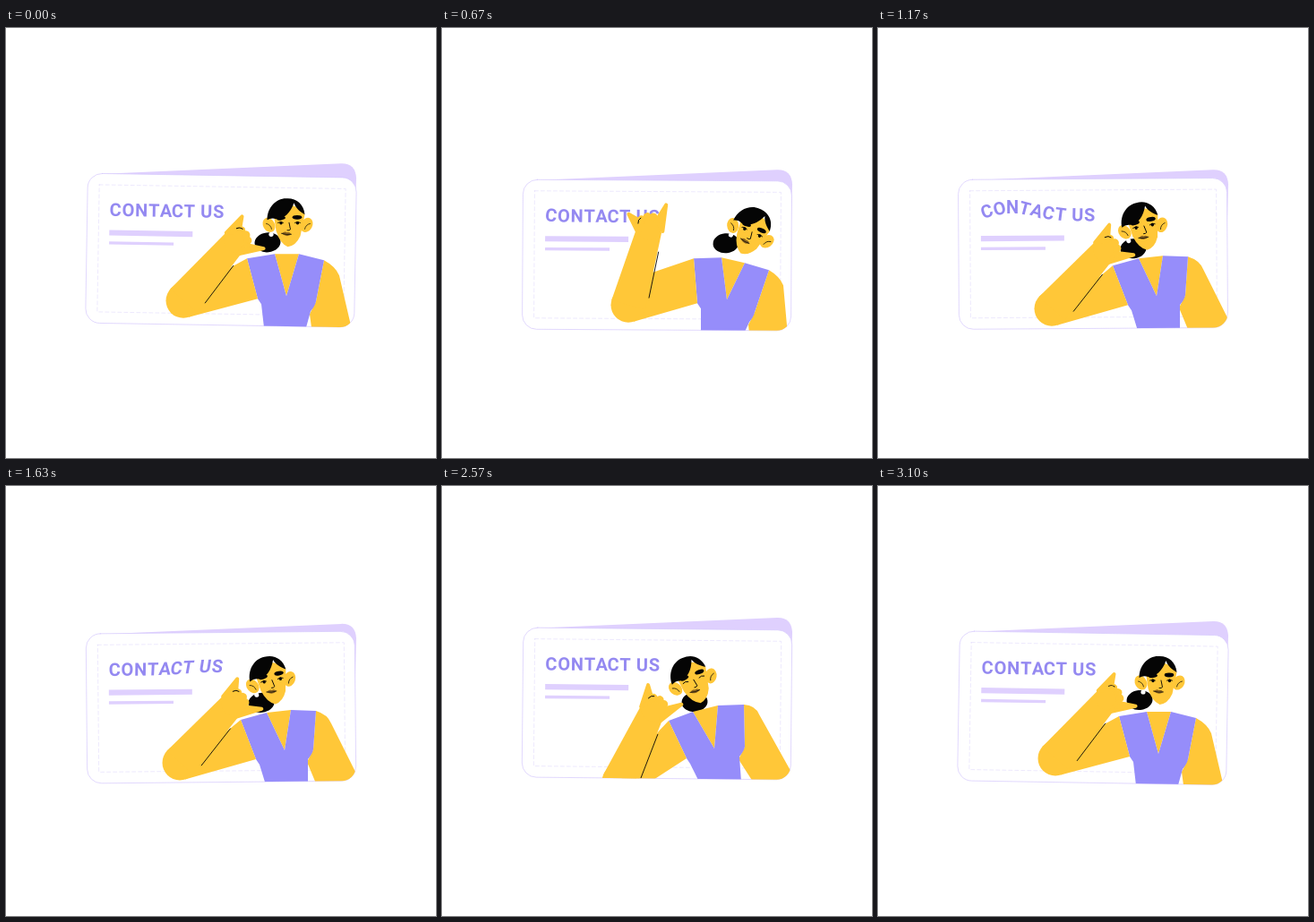
An HTML page with a canvas for the animation above (3130 ms loop, 480x480 px).

```html
<!DOCTYPE html>
<html lang="en">
<head>
<meta charset="utf-8">
<title>Contact card</title>
<style>
html, body { margin: 0; width: 100%; height: 100%; overflow: hidden; background: #fff; }
canvas { display: block; width: 480px; height: 480px; }
</style>
</head>
<body>
<canvas width="480" height="480"></canvas>
<script>
const ctx = document.querySelector('canvas').getContext('2d');
const LOOP = 3130, TAU = Math.PI * 2, RAD = Math.PI / 180;
const SKIN = '#ffc738', VEST = '#968dfa', TEXT = '#9489f1', PALE = '#dfd0fe', INK = '#050505';

// Joints: [x, y] points, or single values for angles and amounts.
const ear = {
  head: [314.5, 222], tilt: [0], bun: [292, 241],
  L1: [269, 259], L2: [300, 254], V: [313, 301], R1: [327, 254], R2: [355, 261],
  sideR: [346, 307], hipR: [335, 336], hipL: [288, 336], sideL: [281, 304],
  shoulder: [368, 268], outer: [386, 338], inner: [341, 336],
  elbow: [198, 306], arm: [41], hand: [60], crease: [64], eyes: [1]
};
const wave = {
  head: [343.5, 224.5], tilt: [25], bun: [317, 235],
  L1: [281, 252], L2: [312, 251], V: [318, 298], R1: [338, 257], R2: [365, 265],
  sideR: [349, 312], hipR: [337, 336], hipL: [289, 336], sideL: [285, 302],
  shoulder: [377, 272], outer: [386, 338], inner: [343, 336],
  elbow: [208, 304], arm: [15.6], hand: [-10], crease: [42], eyes: [1]
};
const lean = {
  head: [296, 219], tilt: [-11], bun: [285, 241],
  L1: [262, 260], L2: [291, 252], V: [311, 294], R1: [318, 249], R2: [346, 250],
  sideR: [343, 293], hipR: [337, 336], hipL: [291, 336], sideL: [279, 304],
  shoulder: [359, 254], outer: [396, 330], inner: [348, 336],
  elbow: [194, 308], arm: [42], hand: [55], crease: [64], eyes: [1]
};
const call = {
  head: [280.5, 225.5], tilt: [-20], bun: [282, 247],
  L1: [253, 268], L2: [280, 258], V: [304, 299], R1: [308, 251], R2: [337, 250],
  sideR: [338, 297], hipR: [334, 336], hipL: [287, 336], sideL: [273, 310],
  shoulder: [350, 251], outer: [396, 336], inner: [347, 336],
  elbow: [198, 336], arm: [25], hand: [34], crease: [70], eyes: [0]
};
const keys = [[0, ear], [60, ear], [600, wave], [700, wave], [1150, lean], [2050, lean],
  [2540, call], [2620, call], [3080, ear], [LOOP, ear]];

function poseAt(t) {
  const i = keys.findIndex(k => k[0] > t);
  const [t0, a] = keys[i - 1], [t1, b] = keys[i];
  const s = (t - t0) / (t1 - t0), e = s * s * (3 - 2 * s), pose = {};
  for (const name in a) pose[name] = a[name].map((v, j) => v + (b[name][j] - v) * e);
  return pose;
}

const shift = ([x, y], dx, dy) => [x + dx, y + dy];

function poly(points, color) {
  ctx.beginPath();
  points.forEach(p => ctx.lineTo(...p));
  ctx.closePath();
  ctx.fillStyle = color;
  ctx.fill();
}

function oval(x, y, rx, ry, color, rot = 0) {
  ctx.beginPath();
  ctx.ellipse(x, y, rx, ry, rot, 0, TAU);
  ctx.fillStyle = color;
  ctx.fill();
}

function shape(d, color) {
  ctx.fillStyle = color;
  ctx.fill(new Path2D(d));
}

function line(d, width = 0.9, color = INK) {
  ctx.strokeStyle = color;
  ctx.lineWidth = width;
  ctx.stroke(new Path2D(d));
}

function local(x, y, angle, draw) {
  ctx.save();
  ctx.translate(x, y);
  ctx.rotate(angle);
  draw();
  ctx.restore();
}

// A bump rolls through the title, lifting and leaning each letter.
function drawTitle(t) {
  ctx.font = 'bold 20px Roboto, sans-serif';
  ctx.fillStyle = TEXT;
  const centre = 150 + (t - 1170) * 0.17;
  const height = Math.max(0, Math.min(9, 9 - (t - 1170) * 0.013));
  const late = Math.max(0, Math.min(1, (t - 1250) / 300));
  const word = 'CONTACT US';
  [...word].forEach((ch, i) => {
    const w = ctx.measureText(ch).width;
    const x = 115 + ctx.measureText(word.slice(0, i)).width + i * 0.75 + w / 2;
    const d = x - centre, bump = height * Math.exp(-d * d / 1350);
    const skew = -0.22 * late * Math.exp(-((d + 22) ** 2) / 1400);
    ctx.save();
    ctx.translate(x, 204 - bump);
    ctx.rotate(bump * d / 675 * 1.6 * (1 - late * 0.7));
    ctx.transform(1, 0, skew, 1, 0, 0);
    ctx.fillText(ch, -w / 2, 7.2);
    ctx.restore();
  });
}

function drawBody(p) {
  oval(...p.bun, 14.5, 11, INK, -0.1);

  ctx.beginPath();
  ctx.moveTo(...p.R2);
  ctx.quadraticCurveTo(...p.shoulder, ...shift(p.shoulder, 4, 10));
  ctx.lineTo(...p.outer);
  ctx.lineTo(p.outer[0], 345);
  ctx.lineTo(...shift(p.inner, 3, 9));
  ctx.lineTo(...p.inner);
  ctx.lineTo(...shift(p.sideR, -7, 14));
  ctx.lineTo(...p.sideR);
  ctx.fillStyle = SKIN;
  ctx.fill();

  poly([p.L2, p.V, p.R1], SKIN);
  ctx.beginPath();
  [p.L1, p.L2, p.V, p.R1, p.R2, p.sideR].forEach(q => ctx.lineTo(...q));
  ctx.quadraticCurveTo(...shift(p.sideR, -1, 5), ...shift(p.sideR, -6, 11));
  ctx.lineTo(...p.hipR);
  ctx.lineTo(...p.hipL);
  ctx.lineTo(...shift(p.sideL, 4, 6));
  ctx.lineTo(...p.sideL);
  ctx.fillStyle = VEST;
  ctx.fill();
}

function drawHead(p) {
  local(...p.head, p.tilt[0] * RAD, () => {
    oval(-21, -0.5, 6.5, 8.5, SKIN, -0.5);
    oval(21, -0.5, 6.5, 8.5, SKIN, 0.5);
    shape('M-16-15L-13 6Q-9 20 0 24Q9 23 14 12L19-12Q4-32-16-15Z', SKIN);
    shape('M-23-6C-23-20-13-30-2-30C9-31 18-24 19-12C14-15 9-19 7-25C3-14-4-7-13-7Q-18-9-23-6Z', INK);
    line('M-24-2Q-19-1-18 4M25-2Q20-1 19 4', 0.7);
    oval(-18.5, 10, 2.6, 2.6, '#fff');
    oval(10.5, -9, 5.3, 2.4, INK);
    oval(-7.5, -8, 5, 2.1, INK, -0.15);
    line('M-11-3Q-8-5-5-3M8-3Q11-5 14-3M1.5-3L3 4.5Q2 6-.5 5.5');
    const open = p.eyes[0];
    if (open > 0.1) {
      oval(-7.5, -2.6, 1.7, 1.8 * open, INK);
      oval(11, -2.6, 1.7, 1.8 * open, INK);
    }
    shape('M-7 9Q-3 6-1 8Q2 7 4 10Q-1 14-7 9Z', '#8b6420');
    line('M-7 9Q-1 11 4 10', 0.7);
  });
}

function drawArm(p) {
  const a = p.arm[0] * RAD, sin = Math.sin(a), cos = Math.cos(a);
  const [ex, ey] = p.elbow;
  const at = (along, side) => [ex + along * sin + side * cos, ey - along * cos + side * sin];
  const wrist = at(88, 0);

  poly([p.elbow, [ex + 6, ey + 18.5], p.sideL, p.L1, at(p.crease[0], 16)], SKIN);
  oval(ex, ey, 19.5, 19.5, SKIN);
  poly([at(0, -19.5), at(88, -14), at(88, 14), at(0, 19.5)], SKIN);
  const [x0, y0] = at(14, 20), [x1, y1] = at(66, 16.5);
  line(`M${x0} ${y0}L${x1} ${y1}`);

  local(...wrist, p.hand[0] * RAD, () => {
    oval(0, -1, 13.5, 13.5, SKIN);
    for (const [x, y] of [[-7, -12], [0, -14], [6.5, -12.5], [12, -8]]) oval(x, y, 4.6, 4.6, SKIN);
    const fingers = 'M-13 4L-20-20.5L-6-9ZM14 5L23-23.5L9-8Z';
    shape(fingers, SKIN);
    line(fingers, 4, SKIN);
    line('M-11.5-8.5Q-11-13-7.5-14');
  });
}

function draw(t) {
  const phase = t / LOOP * TAU;
  const bob = 6 * Math.sin(phase - 0.28);
  const turn = (0.2 + 0.75 * Math.cos(phase + 0.05)) * RAD;
  const tiltCard = () => {
    ctx.translate(100, 248);
    ctx.rotate(turn);
    ctx.translate(-100, -248);
  };
  const card = new Path2D();
  card.roundRect(90, 164, 300, 167, 16);

  ctx.fillStyle = '#fff';
  ctx.fillRect(0, 0, 480, 480);
  ctx.save();
  ctx.translate(0, bob);
  shape('M104 164.7L374 153Q390 152.500 391 169L389 250H104Z', PALE);

  ctx.save();
  tiltCard();
  ctx.fillStyle = '#fff';
  ctx.fill(card);
  ctx.lineWidth = 0.7;
  ctx.strokeStyle = '#d5c8fc';
  ctx.stroke(card);
  ctx.setLineDash([4, 3]);
  ctx.strokeStyle = '#e6e0fc';
  ctx.strokeRect(103, 176.5, 275, 142);
  ctx.setLineDash([]);
  ctx.fillStyle = PALE;
  ctx.fillRect(115, 226.8, 93, 6.2);
  ctx.fillRect(115, 239.6, 72, 3.3);
  drawTitle(t);
  ctx.restore();

  const clip = new Path2D();
  clip.addPath(card, new DOMMatrix().translate(100, 248).rotate(turn / RAD).translate(-100, -248));
  ctx.clip(clip);
  const pose = poseAt(t);
  drawBody(pose);
  drawHead(pose);
  drawArm(pose);
  ctx.restore();
}

ctx.lineCap = ctx.lineJoin = 'round';
const start = performance.now();
function frame() {
  draw((performance.now() - start) % LOOP);
  requestAnimationFrame(frame);
}
frame();
</script>
</body>
</html>
```
